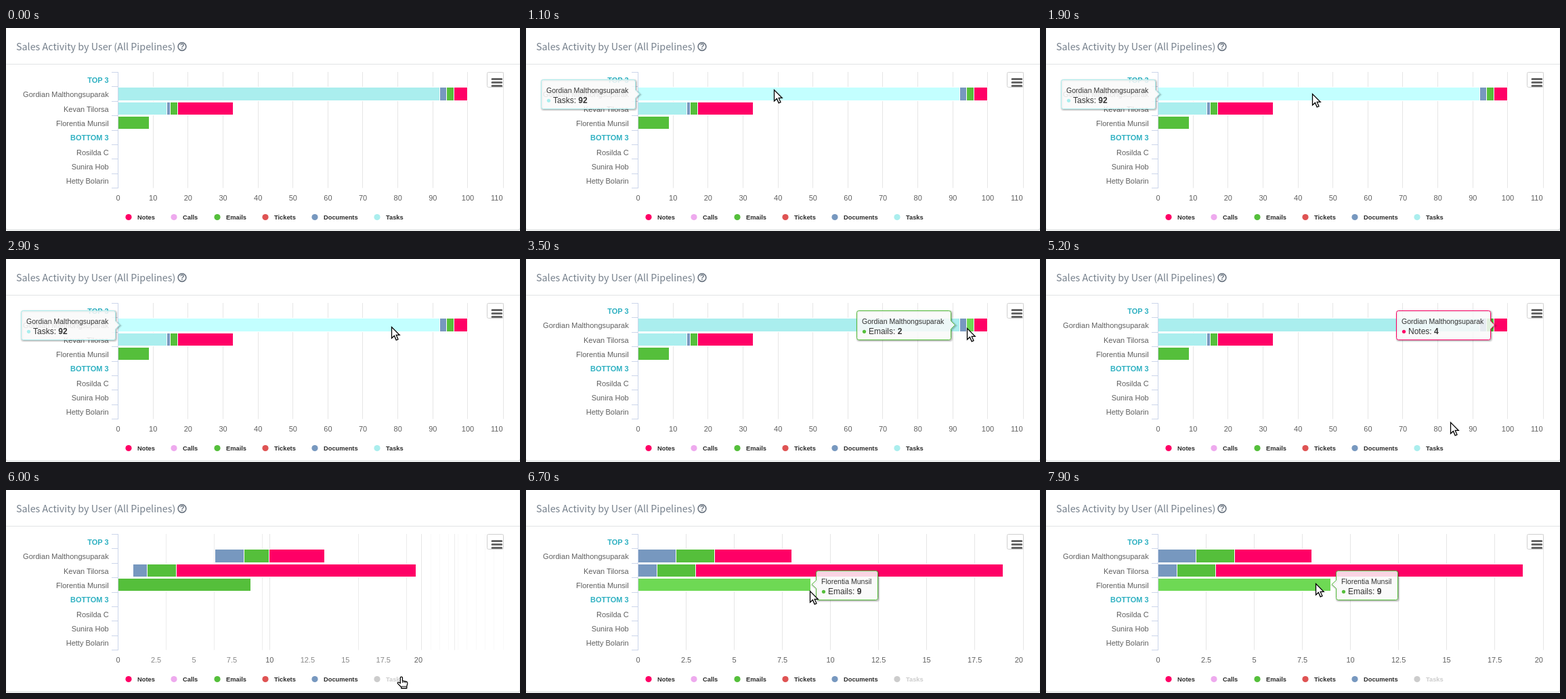
These frames come from a looping animation (759x300 px, 8000 ms). An HTML page:

```html
<!DOCTYPE html>
<html lang="en">
<head>
<meta charset="utf-8">
<title>Sales activity</title>
<style>
  html, body { margin: 0; width: 100%; height: 100%; overflow: hidden; background: #fff; }
  svg { display: block; font-family: "Liberation Sans", Arial, sans-serif; font-size: 11px; fill: #606060; }
  .title { font-family: "Noto Sans CJK JP", "Noto Sans CJK SC", "Noto Sans CJK", "Open Sans", sans-serif; font-size: 14.33px; fill: #76808c; }
  .group { font-weight: bold; fill: #2fb1c2; }
  .legend { font-weight: bold; font-size: 9.3px; }
  .tip { font-size: 12px; fill: #333; }
  .tip .name { font-size: 10.55px; }
</style>
</head>
<body>
<svg id="stage" width="759" height="300" viewBox="0 0 759 300"></svg>
<script>
const LOOP = 8000, STEP = 100;
const LEFT = 165, TOP = 65, WIDTH = 568, HEIGHT = 171, RIGHT = 734;
const OLD_MAX = 110, NEW_MAX = 20;
const CLICK = 5736, MORPH = 400;

const rows = ['TOP 3', 'Gordian Malthongsuparak', 'Kevan Tilorsa', 'Florentia Munsil',
  'BOTTOM 3', 'Rosilda C', 'Sunira Hob', 'Hetty Bolarin'];

// name: [colour, hover colour, legend dot x], in painting order
const series = {
  Notes: ['#ff0066', '#ff1a80', 181],
  Calls: ['#eeaaee', '#ffc4ff', 248],
  Emails: ['#55bf3b', '#6ed954', 312],
  Tickets: ['#df5353', '#f96d6d', 383],
  Documents: ['#7798bf', '#91b2d9', 456],
  Tasks: ['#aaeeee', '#c3ffff', 548]
};
const names = Object.keys(series);

// stacked values by row, from the axis outwards
const stacks = {
  1: { Tasks: 92, Documents: 2, Emails: 2, Notes: 4 },
  2: { Tasks: 14, Documents: 1, Emails: 2, Notes: 16 },
  3: { Emails: 9 }
};
const barBox = { 1: [87.5, 20], 2: [109.5, 19], 3: [130.5, 19] };

const hovers = [
  { from: 1000, to: 3200, row: 1, name: 'Tasks', x: 22 },
  { from: 3200, to: 3300, row: 1, name: 'Documents', x: 496 },
  { from: 3300, to: 3800, row: 1, name: 'Emails', x: 506 },
  { from: 3800, to: CLICK, row: 1, name: 'Notes', x: 517, leave: 4900 },
  { from: 6700, to: LOOP, row: 3, name: 'Emails', x: 428, fresh: true }
];

// time, x, y of the pointer tip
const pointer = [
  [700, 350, 0], [900, 359, 62], [1000, 364, 88], [1100, 366, 91], [1300, 368, 96],
  [1400, 368, 96], [1700, 392, 97], [1800, 392, 97], [1900, 393, 97], [2200, 393, 97],
  [2500, 444, 97], [2600, 444, 97], [2900, 569, 100], [3000, 610, 101], [3100, 634, 101],
  [3200, 645, 101], [3300, 651, 102], [3500, 651, 102], [3700, 657, 100], [3800, 664, 99],
  [4000, 676, 97], [4200, 680, 97], [4800, 680, 97], [5000, 655, 150], [5200, 597, 241],
  [5400, 583, 273], [5500, 582, 277], [6200, 582, 277], [6400, 525, 235], [6600, 440, 169],
  [6700, 419, 149], [6800, 408, 143], [7000, 401, 138], [7800, 401, 138], [7900, 398, 138]
];

const lerp = (a, b, p) => a + (b - a) * p;
const snap = x => Math.floor(x) + 0.5;
const crisp = x => Math.round(x) + 0.5;
const swing = u => 0.5 - Math.cos(Math.PI * Math.min(1, Math.max(0, u))) / 2;
const text = (x, y, s, attrs = '') => `<text x="${x}" y="${y}" ${attrs}>${s}</text>`;
const path = (d, attrs) => `<path d="${d}" ${attrs}/>`;

function frame() {
  return `<rect x="-.5" y="-6" width="760" height="304.5" rx="4" fill="#fff" stroke="#dcdfe0" stroke-width="1.6"/>`
    + path('M0 53.5H759', 'stroke="#e1e3e4"')
    + text(15, 33, 'Sales Activity by User (All Pipelines)', 'class="title"')
    + '<circle cx="260" cy="27.5" r="5.9" fill="none" stroke="#6c7682" stroke-width="1.6"/>'
    + text(260, 31.4, '?', 'text-anchor="middle" font-weight="bold" font-size="11" fill="#6c7682"');
}

function menuButton() {
  return '<rect x="710.5" y="65.5" width="24" height="22" rx="2" fill="#fff" stroke="#cfcfcf"/>'
    + path('M718 75.5H731.7M718 80.5H731.7M718 85.5H731.7',
      'stroke="#666" stroke-width="3" stroke-linecap="round"');
}

function valueAxis(p) {
  const values = [2.5, 5, 7.5, 12.5, 15, 17.5];
  for (let v = 0; v <= OLD_MAX; v += 10) values.push(v);
  const place = (v, max) => v >= max ? RIGHT : LEFT + v / max * WIDTH;
  let lines = '', labels = '';
  for (const v of values) {
    const inOld = v % 10 === 0, inNew = v <= NEW_MAX;
    if ((p === 0 && !inOld) || (p === 1 && !inNew)) continue;
    const a = place(v, OLD_MAX), b = place(v, NEW_MAX);
    const x = inOld ? lerp(a, b, p) : b;
    const alpha = !inOld ? p : inNew ? 1 : (1 - p) * (p ? 0.8 : 1);
    if (v) lines += path(`M${crisp(x)} ${TOP}V${TOP + HEIGHT + 0.5}`, `stroke="#e6e6e6" opacity="${alpha}"`);
    if (!inNew && p > 0) continue;
    const half = String(v).replace('.', '').length * 3.06 + (v % 1 ? 1.5 : 0);
    const center = c => Math.min(c + 0.6, RIGHT - half);
    labels += text(lerp(center(a), center(b), p), 255, v, `text-anchor="middle" opacity="${inOld ? 1 : alpha}"`);
  }
  return lines + labels;
}

function categoryAxis() {
  const pitch = HEIGHT / rows.length;
  let out = '', ticks = `M165.5 ${TOP}V237`;
  for (let i = 0; i <= rows.length; i++) ticks += `M156 ${TOP + crisp(i * pitch)}H165`;
  rows.forEach((name, i) => {
    out += text(151.7, Math.round(80.8 + i * pitch), name,
      `text-anchor="end" ${i % 4 ? '' : 'class="group"'}`);
  });
  return path(ticks, 'stroke="#ccd6eb" fill="none"') + out;
}

// each series starts its move a moment after the one before it
function bars(t, hover) {
  const parts = names.map(() => '');
  for (const row in stacks) {
    const [y, h] = barBox[row];
    let a = 0, b = 0;
    for (const name in stacks[row]) {
      const i = names.indexOf(name), n = stacks[row][name], kept = name !== 'Tasks';
      const p = swing((t - CLICK - 3 - 2.3 * i) / MORPH);
      const edge = (u, v) => snap(LEFT + 0.15 + lerp(u * 5.168, v * 28.41, p));
      const a2 = a + n, b2 = kept ? b + n : b;
      if (kept || t < CLICK) {
        const x = edge(a, b), lit = hover && hover.row == row && hover.name === name;
        parts[i] += `<rect x="${x}" y="${y}" width="${edge(a2, b2) - x}" height="${h}" fill="${series[name][lit ? 1 : 0]}" stroke="#fff"/>`;
      }
      a = a2; b = b2;
    }
  }
  return parts.join('');
}

function legend(t) {
  let out = '';
  for (const name of names) {
    const [color, , x] = series[name], mine = name === 'Tasks';
    const off = mine && t >= CLICK;
    const ink = off ? '#ccc' : mine && t >= 5400 ? '#000' : '#2b2b2b';
    out += `<circle cx="${x}" cy="279.5" r="4.6" fill="${off ? '#ccc' : color}"/>`
      + text(x + 13, 283, name, `class="legend" fill="${ink}"`);
  }
  return out;
}

// the box closes in on its target by a fixed share of the gap
function tipX(t) {
  let x = null;
  for (const h of hovers) {
    if (t < h.from) break;
    x = x === null || h.fresh ? h.x : lerp(h.x, x, Math.pow(0.33, (Math.min(t, h.to) - h.from) / 100));
  }
  return x;
}

function tooltip(t, h) {
  const leftArrow = h.row === 3, w = leftArrow ? 91 : 139, color = series[h.name][0];
  const x = crisp(tipX(t)), y = leftArrow ? 120 : 77;
  const d = `M3 0H${w - 3}Q${w} 0 ${w} 3`
    + (leftArrow ? '' : `V15L${w + 6} 21L${w} 27`)
    + `V40Q${w} 43 ${w - 3} 43H3Q0 43 0 40`
    + (leftArrow ? 'V26L-6.5 20L0 14' : '') + 'V3Q0 0 3 0Z';
  const shadow = [5, 3, 1].map((s, i) =>
    path(d, `transform="translate(1 1)" fill="none" stroke="#000" stroke-width="${s}" opacity="${0.05 * (i + 1)}"`)).join('');
  return `<g class="tip" transform="translate(${x} ${y - 0.5})">${shadow}`
    + path(d, `fill="#f9f9f9" fill-opacity=".85" stroke="${color}"`)
    + text(7.5, 19, rows[h.row], 'class="name"')
    + `<circle cx="11" cy="30.8" r="2.6" fill="${color}"/>`
    + text(17.5, 34.5, `${h.name}: <tspan font-weight="bold">${stacks[h.row][h.name]}</tspan>`) + '</g>';
}

function cursor(t) {
  if (t < pointer[0][0]) return '';
  let i = pointer.findIndex(k => k[0] > t);
  if (i < 0) i = pointer.length;
  const a = pointer[i - 1], b = pointer[i] || a;
  const p = a === b ? 0 : (t - a[0]) / (b[0] - a[0]);
  const x = lerp(a[1], b[1], p), y = lerp(a[2], b[2], p);
  if (t >= 5400 && t <= 6200) {
    return `<g transform="translate(${x - 4.5} ${y - 1.5}) scale(1.06)" fill="#fff" stroke="#000" stroke-width="1.2" stroke-linejoin="round">`
      + path('M4.5 2Q4.5.6 6 .6T7.5 2V6L13 7.2Q14.7 7.8 14.5 9.8L13.5 14V16.5H5.8V14.8L1 10Q.3 8.6 1.4 8.1 2.5 7.8 4.5 9.6Z', '')
      + path('M7.5 6V9M9.7 6.6V9M11.9 7V9.3M6 14H13.4', 'fill="none" stroke-width=".9"') + '</g>';
  }
  return path('M.5 .5V17L4.4 13.4L7.2 19.8L10 18.6L7.2 12.4H12.2Z',
    `transform="translate(${x} ${y})" fill="#fff" stroke="#000" stroke-width="1.3"`);
}

function scene(t) {
  const tip = hovers.find(h => t >= h.from && t < h.to);
  const lit = tip && !(tip.leave && t >= tip.leave) ? tip : null;
  return frame() + valueAxis(swing((t - CLICK) / MORPH)) + bars(t, lit) + categoryAxis()
    + menuButton() + legend(t) + (tip ? tooltip(t, tip) : '') + cursor(t);
}

const stage = document.getElementById('stage');
const start = performance.now();
let shown = -1;

function tick() {
  const t = Math.floor(((performance.now() - start) % LOOP) / STEP) * STEP;
  if (t !== shown) stage.innerHTML = scene(shown = t);
  requestAnimationFrame(tick);
}
tick();
</script>
</body>
</html>
```
